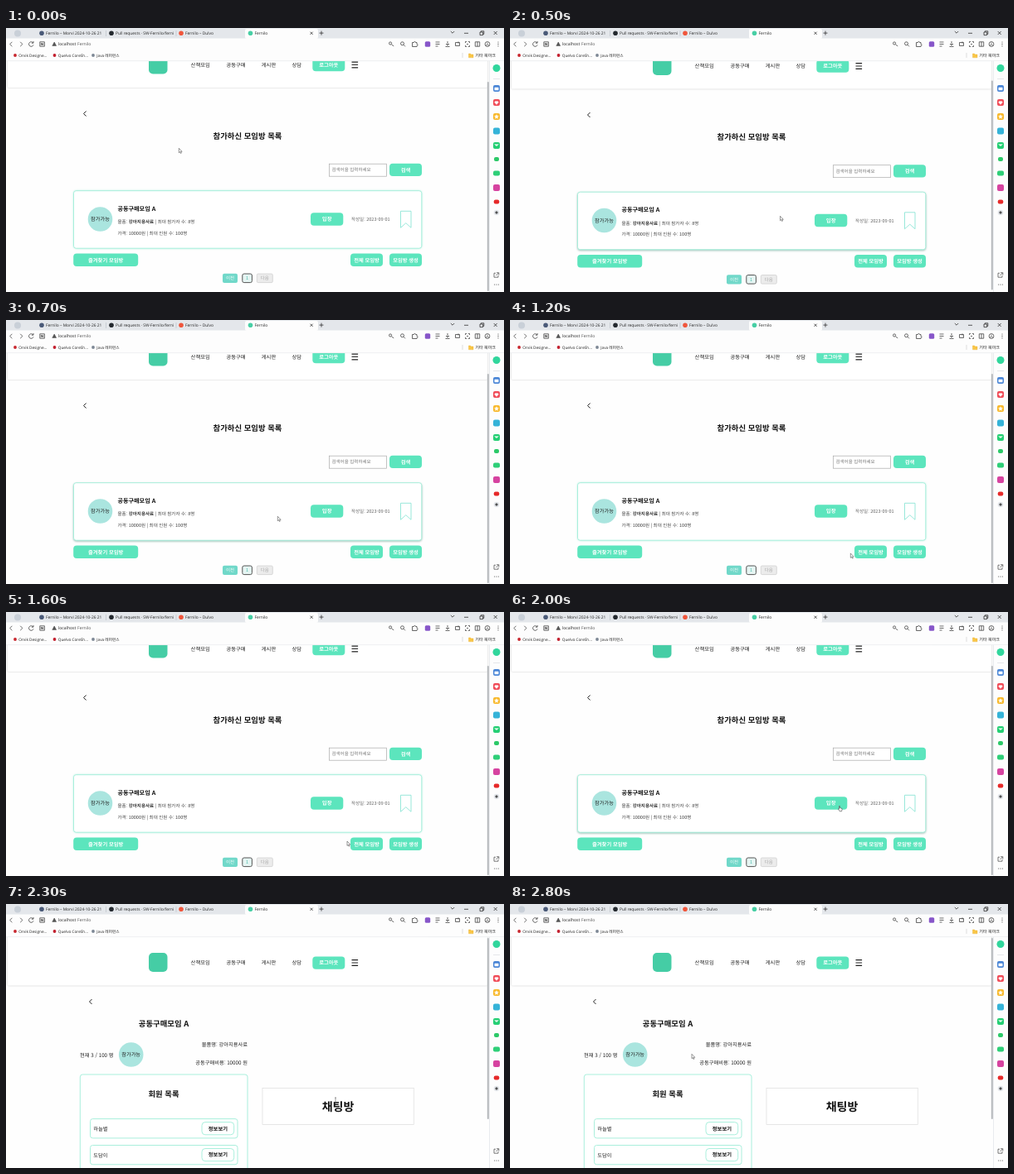
These frames come from a looping animation (600 px wide and 319 px high, 3300 ms). An HTML page:

```html
<!DOCTYPE html>
<html lang="ko">
<head>
<meta charset="utf-8">
<title>Fernilo</title>
<style>
html, body { margin: 0; width: 100%; height: 100%; overflow: hidden; background: #fff; }
svg { display: block; width: 100vw; height: 100vh; }
text { font-family: "Noto Sans CJK KR", "Noto Sans CJK", sans-serif; white-space: pre; text-rendering: geometricPrecision; }
.ui text { font-family: "Open Sans", "Noto Sans CJK KR", sans-serif; }
#card { filter: drop-shadow(0 .5px 1px #5adfb866); }
#card.hover { filter: drop-shadow(0 1px 1.1px #5f9c8c99); }
#bar { filter: drop-shadow(0 .8px 1px #0003); }
</style>
</head>
<body>
<svg id="stage" viewBox="0 0 600 319" xmlns="http://www.w3.org/2000/svg"></svg>
<script>
const LOOP = 3300, SCROLL = 26.5;
const MINT = '#5ce5bd', PALE = '#aae5df', EDGE = '#a0eed8';

// Text is placed by the vertical middle of its glyphs.
const text = (x, y, str, size, { fill = '#222', weight = 400, anchor = 'start' } = {}) =>
  `<text x="${x}" y="${y + size * .37}" font-size="${size}" fill="${fill}" font-weight="${weight}" text-anchor="${anchor}">${str}</text>`;
const title = (x, y, str, size = 9.4) => text(x, y, str, size, { fill: '#111', weight: 700, anchor: 'middle' });
const rect = (x, y, w, h, fill, r = 0, stroke = 'none', sw = .9) =>
  `<rect x="${x}" y="${y}" width="${w}" height="${h}" rx="${r}" fill="${fill}" stroke="${stroke}" stroke-width="${sw}"/>`;
const dot = (x, y, r, fill) => `<circle cx="${x}" cy="${y}" r="${r}" fill="${fill}"/>`;
const line = (d, stroke = '#444', sw = .8, fill = 'none') =>
  `<path d="${d}" stroke="${stroke}" stroke-width="${sw}" fill="${fill}"/>`;
const button = (x, y, w, label) => rect(x, y, w, 15.4, MINT, 4) +
  text(x + w / 2, y + 7.7, label, 6.3, { fill: '#fff', weight: 700, anchor: 'middle' });
const badge = (x, y) => dot(x, y, 14.8, PALE) +
  text(x, y, '참가가능', 6.2, { weight: 500, anchor: 'middle' });
const chevron = (x, y) => line(`M${x + 1.5} ${y - 3}l-3 3 3 3`, '#222', 1);

function chrome() {
  const dark = { fill: '#222' };
  const tabs = [
    [43, '#4a5a78', 'Fernilo – Morvi 2024-10-26 21'],
    [127, '#24292f', 'Pull requests · SW-Fernilo/ferni'],
    [211, '#f0563c', 'Fernilo – Dulvo'],
    [294.5, '#48cfa5', 'Fernilo']];
  const marks = [
    [11, '#c8262d', 'Orvik Designe...'],
    [58.5, '#c3202f', 'Quelvo CoreSh...'],
    [105, '#7c8794', 'Java 레퍼런스']];
  const side = [[73, '#4a86d6'], [90, '#f04c58'], [107, '#f8b92c'], [124.5, '#35b3d8'], [142, '#25cf74'],
    [158.5, '#2cc968', 6, 5], [175.5, '#2fcf78', 8, 6], [193, '#d643a0'], [210, '#e62a2a', 6.5, 5]];
  const tools = [520, 532, 544, 556, 568, 580].map((x, i) => [
    `M${x - 2.5} 17h5M${x - 2.5} 19.5h5M${x - 2.5} 22h3`,
    `M${x} 16v5m-2-2l2 2 2-2M${x - 2.5} 22.5h5`,
    `M${x - 2.5} 17.5h5v4h-5zM${x + 1} 16.5v2`,
    `M${x - 2.5} 18v-1.5h1.5m2 0h1.5v1.5m0 3v1.5h-1.5m-2 0h-1.5v-1.5M${x - 1} 19.5h2`,
    `M${x - 2.7} 16.8h5.4v5.4h-5.4zM${x} 16.8v5.4`,
    `M${x - 2.9} 19.5a2.9 2.9 0 1 1 5.8 0a2.9 2.9 0 1 1-5.8 0M${x - 1.6} 21.5c0-2 3.2-2 3.2 0M${x} 17.8v1`][i]);
  return `<g class="ui">
    ${rect(0, 0, 600, 13, '#e4e7eb')}
    ${rect(0, 12.5, 600, 27, '#fdfdfd')}
    ${rect(288, 1, 88, 12, '#fdfdfd', 2)}
    ${line('M120.5 3v7M205 3v7', '#b8bec6', .6)}
    ${dot(14, 6.5, 4, '#c9d0d8')}
    ${tabs.map(([x, c, s]) => dot(x, 6.2, 2.8, c) + text(x + 5, 6.2, s, 4.9, dark)).join('')}
    ${line('M366.5 4.7l3.2 3.2m0-3.2l-3.2 3.2M380 3.6v5M377.5 6.1h5M535.8 4l2.2 2.2 2.2-2.2M552 6.3h5M571 5h3.6v3.6H571zM572.2 5V3.8h3.6v3.6h-1.2M587.7 4l4 4m0-4l-4 4', '#333', .8)}
    ${line('M7.4 16.8L4.7 19.5l2.7 2.7M17.2 16.8l2.7 2.7-2.7 2.7M32.7 18a2.8 2.8 0 1 0 .3 2.4M33 16v2.2h-2.2M40.8 16.8h5.6v5.4h-5.6zM42.4 21v-3l2.2 3v-3', '#444', .8)}
    ${line('M58.2 17l2.4 4.5h-4.8z', '#444', .5, '#555')}
    ${text(63, 19.3, 'localhost', 5.1, dark)}${text(86, 19.3, 'Fernilo', 5.1, { fill: '#555' })}
    ${line('M464.5 19.8l2.6 2.2M461.5 18.5a1.6 1.6 0 1 1 3.2 0a1.6 1.6 0 1 1-3.2 0M475.5 18.8a2 2 0 1 1 4 0a2 2 0 1 1-4 0M479 20.3l2 2M489.5 17.5h2a1 1 0 0 1 2 0h1.5v2a1 1 0 0 1 0 2v1h-5.5z', '#444', .8)}
    ${rect(504.8, 16.3, 6.4, 6.4, '#8756c9', 1.5)}
    ${line(tools.join(''), '#444', .8)}
    ${[17, 19.4, 21.8].map(y => dot(593, y, .6, '#444')).join('')}
    ${marks.map(([x, c, s]) => dot(x, 33, 1.9, c) + text(x + 4.3, 33, s, 4.7, dark)).join('')}
    ${line('M550 30v6', '#ccc', .6)}
    ${line('M557.5 31h2l.8 1h2.7v3.8h-5.5z', '#e8ae2c', .4, '#f9c647')}
    ${text(565.3, 33, '기타 북마크', 5.1, dark)}
    ${line('M0 39.7h600', '#e2e5e8', .6)}
    ${rect(582.5, 40, 17.5, 279, '#fdfdfd')}
    ${line('M582.5 40v279', '#dcdfe4', .6)}
    ${dot(591, 48.5, 4.5, '#31d69c')}
    ${line('M587 61.5h8', '#d5d9de', .6)}
    ${side.map(([y, c, w = 8, h = w]) => rect(591 - w / 2, y - h / 2, w, h, c, 2)).join('')}
    ${line('M588.8 72h4.4v3h-4.4zM591 92.4l-2-2.1a1.1 1.1 0 0 1 2-1.2a1.1 1.1 0 0 1 2 1.2zM591 104.7l.7 1.5 1.7.2-1.2 1.2.3 1.7-1.5-.8-1.5.8.3-1.7-1.2-1.2 1.7-.2zM588.5 140.5l2.5 2 2.5-2', '#fff', .5, '#fff')}
    ${dot(591, 223, 3.3, '#e3e6ea')}${line('M589.3 223h3.4M591 221.3v3.4', '#222', 1)}
    ${line('M590 296.2h-2v5h5v-2M591 295.7h2.8v2.8M593.6 295.9l-3.2 3.2', '#444', .7)}
    ${[588.6, 591, 593.4].map(x => dot(x, 310, .6, '#555')).join('')}
  </g>`;
}

function header() {
  const menu = [[222.6, '산책모임'], [265.4, '공동구매'], [307.8, '게시판'], [344.4, '상담']];
  return `<g id="bar">${rect(2, 30, 578, 68.5, '#fff', 1.5)}</g>
    ${rect(172, 59, 22.5, 23, '#45cda5', 5)}
    ${menu.map(([x, s]) => text(x, 71, s, 6.3)).join('')}
    ${button(369.3, 63.4, 39, '로그아웃')}
    ${line('M416.5 67.6h7.6M416.5 71h7.6M416.5 74.4h7.6', '#222', 1.1)}`;
}

function listPage() {
  const small = 5.5, grey = { fill: '#444' };
  const mid = fill => ({ fill, anchor: 'middle' });
  return `${chevron(95, 103.5)}
    ${title(291, 130.3, '참가하신 모임방 목록')}
    ${rect(389.5, 164.2, 69, 15, '#fff', 0, '#aaa', .7)}
    ${text(392.5, 171.3, '검색어을 입력하세요', small, { fill: '#777' })}
    ${button(462, 163.7, 39, '검색')}
    <g id="card">${rect(81.5, 196.7, 419.3, 69.5, '#fff', 3, EDGE)}</g>
    ${badge(113.5, 231)}
    ${text(134.5, 218.3, '공동구매모임 A', 7.1, { fill: '#111', weight: 700 })}
    ${text(134.5, 234.3, '물품: <tspan font-weight="700" fill="#333">강아지용사료</tspan> | 최대 참가자 수: 8명', small, grey)}
    ${text(134.5, 247.5, '가격: 10000원 | 최대 인원 수: 100명', small, grey)}
    ${button(367, 223.3, 39.3, '입장')}
    ${text(416, 231.3, '작성일: 2023-09-01', small, { fill: '#666' })}
    ${line('M475.5 221.3h12.5v20l-6.2-5.6-6.3 5.6z', '#8ee6d6', .9)}
    ${button(81.2, 272.6, 78, '즐겨찾기 모임방')}
    ${button(415, 272.6, 39, '전체 모임방')}
    ${button(462, 272.6, 39, '모임방 생성')}
    ${rect(261, 296.7, 18, 11.2, '#70d8c9', 2)}${text(270, 302.2, '이전', small, mid('#fff'))}
    ${rect(284.8, 297, 11.6, 10.6, '#e6f5f3', 2, '#555', 1)}${text(290.6, 302.2, '1', small, mid('#48b8a8'))}
    ${rect(302.3, 297, 19, 10.6, '#ececec', 1.5, '#ccc', .7)}${text(311.8, 302.2, '다음', small, mid('#aaa'))}`;
}

function roomPage() {
  const size = 6.25, end = { anchor: 'end' };
  const member = (y, name) => rect(101.5, y, 177.5, 23.3, '#fff', 3, EDGE) +
    text(105.3, y + 12, name, size) +
    rect(236, y + 4, 38.7, 15.2, '#fff', 4, EDGE) +
    text(255.4, y + 11.6, '정보보기', 6.3, { fill: '#111', weight: 700, anchor: 'middle' });
  return `${chevron(102, 118)}
    ${title(190, 144.8, '공동구매모임 A')}
    ${text(291, 169.5, '물품명: 강아지용사료', size, end)}
    ${text(291, 191.3, '공동구매비용: 10000 원', size, end)}
    ${text(89, 182.3, '현재 3 / 100 명', size)}
    ${badge(150.7, 182)}
    ${rect(89.3, 206, 201.7, 130, '#fff', 3, EDGE)}
    ${title(190, 229.3, '회원 목록')}
    ${member(259.6, '하늘별')}${member(291.5, '도담이')}
    ${rect(309, 222.5, 182.3, 44, '#fff', 0, '#ddd', .7)}
    ${title(400, 244.8, '채팅방', 14)}`;
}

const cursors = {
  arrow: line('M0 0v5.4l1.3-1.1.8 1.9.9-.4-.8-1.8h1.6z', '#444', .55, '#fff'),
  hand: line('M-.5.5q.5-.8 1 0v2.2l2.3.7q.5.3.3 1.2l-.5 2.2H.2l-1.7-2.7q.3-.7 1 0z', '#333', .55, '#fff'),
  beam: line('M-1 0h2M0 0v6M-1 6h2', '#555', .6)
};

const stage = document.getElementById('stage');
stage.innerHTML = `<clipPath id="view"><rect y="40" width="582" height="279"/></clipPath>
  ${rect(0, 0, 600, 319, '#fefefe')}
  <g clip-path="url(#view)">
    <g id="head">${header()}</g>
    <g id="list">${listPage()}</g>
    <g id="room">${roomPage()}</g>
    <rect id="thumb" x="579.8" width="2" rx="1" fill="#b5b8bc"/>
  </g>
  ${chrome()}
  ${Object.entries(cursors).map(([k, s]) => `<g id="${k}">${s}</g>`).join('')}`;

const el = id => document.getElementById(id);
const show = (id, on) => el(id).setAttribute('display', on ? 'inline' : 'none');
const move = (id, x, y) => el(id).setAttribute('transform', `translate(${x} ${y})`);
const inside = (x, y, l, t, r, b) => x >= l && x <= r && y >= t && y <= b;

// The pointer is held between these moments: [ms, x, y].
const pointer = [
  [0, 208.3, 145.3], [100, 213, 149], [200, 255, 180], [300, 305, 214],
  [500, 325.5, 227.3], [600, 327, 233], [700, 327.3, 237.3],
  [900, 338, 247], [1000, 365, 264], [1100, 397, 278], [1200, 410.3, 281.9],
  [1600, 411, 277], [1700, 408, 265], [1800, 404, 252], [1900, 399, 240], [2000, 397, 234],
  [2400, 385, 232], [2500, 330, 228], [2800, 219, 181.3]];

function draw(t) {
  const [, x, y] = pointer.findLast(p => p[0] <= t);
  const room = t >= 2100;
  const nudge = t >= 300 && t < 600 ? 1.5 : t >= 600 && t < 700 ? .7 : 0;
  const scroll = room ? 0 : SCROLL - nudge;
  show('list', !room);
  show('room', room);
  move('head', 0, -scroll);
  move('list', 0, nudge);
  el('thumb').setAttribute('y', room ? 41 : 65 - nudge);
  el('thumb').setAttribute('height', room ? 219 : 253);
  el('card').classList.toggle('hover', inside(x, y, 81, 196, 501, 266));
  const kind = room ? (inside(x, y, 380, 230, 420, 256) ? 'beam' : 'arrow')
    : inside(x, y, 367, 223, 406, 239) ? 'hand' : 'arrow';
  for (const k in cursors) show(k, k === kind);
  move(kind, x, y);
}

function tick(now) {
  draw(now % LOOP);
  requestAnimationFrame(tick);
}
draw(0);
requestAnimationFrame(tick);
</script>
</body>
</html>
```
